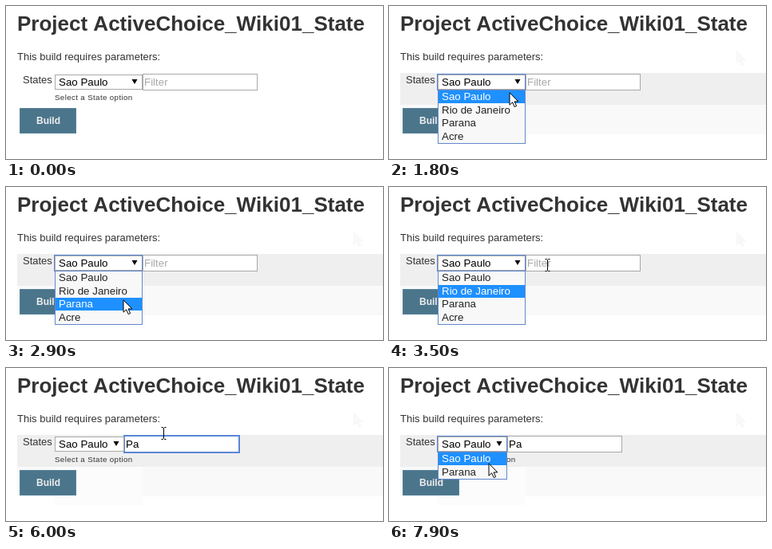
Write an HTML page that moves like this. It is 472 px wide and 192 px high and loops after 8000 ms.

```html
<!DOCTYPE html>
<html lang="en">
<head>
<meta charset="utf-8">
<title>Build parameters</title>
<style>
  html, body { margin: 0; width: 100%; height: 100%; overflow: hidden; background: #fff; }
  svg { display: block; width: 472px; height: 192px; }
  text { font: 13.333px "Liberation Sans", Arial, sans-serif; font-kerning: none; fill: #000; white-space: pre; }
  text.page { font-size: 13px; fill: #333; }
  text.title { font-size: 26px; font-weight: bold; fill: #333; }
  text.hint { font-size: 9.75px; letter-spacing: .36px; fill: #333; }
  text.button { font-size: 12px; font-weight: bold; fill: #eee; }
  text.item { fill: #222; }
  text.picked { fill: #fff; }
  rect { shape-rendering: crispEdges; }
  .box { fill: #fff; stroke: #a9a9a9; }
  .ring { fill: none; stroke: #5a86d6; }
  .list { fill: #f8f8f8; stroke: #6288cc; }
  .pick { fill: #1e90ff; }
  .arrow { fill: #fff; stroke: #000; }
  .trail { fill: #f9f9f9; stroke: #f6f6f6; }
</style>
</head>
<body>
<svg viewBox="0 0 472 192" xmlns="http://www.w3.org/2000/svg">
  <defs>
    <path id="arrowShape" d="M.5 .8V16.2L4.1 12.8L6.7 18.6L9.1 17.5L6.6 11.9H11.4Z"/>
  </defs>
  <rect id="row" x="14" y="84" width="458" height="40" fill="#efefef"/>
  <rect id="band" x="14" y="124" width="458" height="37" fill="#f9f9f9"/>
  <rect id="patch" x="61" y="124" width="110" height="48" fill="#fcfcfc"/>
  <use id="trail" class="trail" href="#arrowShape" x="435" y="56"/>

  <text class="title" x="14" y="31">Project ActiveChoice_Wiki01_State</text>
  <text class="page" x="14" y="68">This build requires parameters:</text>
  <text class="page" x="21" y="97">States</text>
  <text class="hint" x="61" y="118">Select a State option</text>
  <rect x="17.5" y="128.5" width="70" height="31" fill="#4b758b" stroke="#56829a"/>
  <text class="button" x="38" y="148">Build</text>

  <g id="input">
    <rect class="box" x=".5" y="85.5" width="143" height="20"/>
    <rect class="ring" id="inputRing" x="0" y="85" width="144" height="21" stroke-width="2"/>
    <text id="typed" x="2" y="100"></text>
    <rect id="caret" y="88" width="1" height="15"/>
  </g>

  <rect class="box" id="select" x="61.5" y="86.5" height="18"/>
  <rect class="ring" id="selectRing" x="60.5" y="85.5" height="20"/>
  <text x="66" y="100">Sao Paulo</text>
  <path id="mark" d="M-3.5 92h7l-3.5 6z"/>

  <g id="list">
    <rect class="list" id="frame" x="61.5" y="105.5"/>
    <rect class="pick" id="pick" x="62" height="16"/>
    <g id="items"></g>
  </g>

  <g id="cursor">
    <use id="arrow" class="arrow" href="#arrowShape" x=".5"/>
    <path id="beam" d="M-2.5 -7.5H-.5L.5 -6.5L1.5 -7.5H3.5M.5 -6.5V6.5M-2.5 7.5H-.5L.5 6.5L1.5 7.5H3.5" fill="none" stroke="#000"/>
  </g>
</svg>
<script>
const LOOP = 8000, TICK = 100, ITEM = 16.5, TOP = 106;
const STATES = ["Sao Paulo", "Rio de Janeiro", "Parana", "Acre"];

// Pointer moves; bend bows the path up or down
const ENTRY = { x: 435, y: 56 };
const MOVES = [
  { from: 100, to: 1100, x: 161, y: 96, bend: 55 },
  { from: 1600, to: 1800, x: 150, y: 108, bend: 0 },
  { from: 1800, to: 2500, x: 128, y: 155, bend: 0 },
  { from: 2700, to: 3500, x: 198, y: 98, bend: 0 },
  { from: 3900, to: 4200, x: 206, y: 101, bend: -6 },
  { from: 5900, to: 6700, x: 135, y: 100, bend: -50 },
  { from: 7600, to: 7900, x: 124, y: 119, bend: 0 }
];

const $ = id => document.getElementById(id);
const set = (id, props) => {
  for (const key in props) $(id).setAttribute(key, props[key]);
};
const show = (id, on) => { $(id).style.display = on ? "" : "none"; };
const within = (t, a, b) => t >= a && t < b;

function pointer(t) {
  let { x, y } = ENTRY;
  for (const m of MOVES) {
    const k = Math.max(0, Math.min(1, (t - m.from) / (m.to - m.from)));
    x += (m.x - x) * k;
    y += (m.y - y) * k + m.bend * Math.sin(Math.PI * k);
  }
  return [Math.round(x), Math.round(y)];
}

function drawList(names, width, index) {
  set("frame", { width: width - 1, height: names.length * ITEM + 1 });
  set("pick", { width: width - 2, y: Math.round(TOP + index * ITEM) });
  $("items").innerHTML = names.map((name, i) =>
    `<text class="item${i === index ? " picked" : ""}" x="66" y="${Math.round(TOP + i * ITEM + 12)}">${name}</text>`
  ).join("");
}

function draw(t) {
  const narrow = t >= 5100;
  const width = narrow ? 87 : 110;
  const [x, y] = pointer(t);
  const beam = within(t, 3400, 6100);

  show("row", t >= 300 && !(t > 6000 && y < 84));
  show("band", t >= 500);
  show("patch", t >= 3700);
  show("trail", t >= 200);

  const text = t < 5000 ? "" : t < 5300 ? "P" : "Pa";
  const focus = within(t, 3700, 7200);
  const lastKey = t < 5000 ? 3700 : t < 5300 ? 5000 : 5300;
  set("input", { transform: `translate(${61 + width} 0)` });
  $("typed").textContent = text || "Filter";
  $("typed").style.fill = text ? "#000" : "#a9a9a9";
  show("inputRing", focus);
  show("caret", focus && Math.floor((t - lastKey) / 500) % 2 === 0);
  set("caret", { x: 2 + Math.round(8.3 * text.length) });

  set("select", { width: width - 1 });
  set("selectRing", { width });
  set("mark", { transform: `translate(${51 + width} 0)` });
  show("selectRing", within(t, 1300, 3700) || t >= 7200);

  const open = within(t, 1400, 3700) || t >= 7300;
  show("list", open);
  if (open) {
    // The mark stays on the item where the pointer left the list
    const left = within(t, 3200, 3700);
    const index = left ? 1 : Math.max(0, Math.floor((y - TOP + 1) / ITEM));
    drawList(narrow ? STATES.filter(s => s.includes("Pa")) : STATES, width, index);
  }

  set("cursor", { transform: `translate(${x} ${y})` });
  show("cursor", t >= 100);
  show("arrow", !beam);
  show("beam", beam);
}

const begin = performance.now();
let last = -1;
function frame() {
  const t = Math.floor(((performance.now() - begin) % LOOP) / TICK) * TICK;
  if (t !== last) draw(last = t);
  requestAnimationFrame(frame);
}
frame();
</script>
</body>
</html>
```
